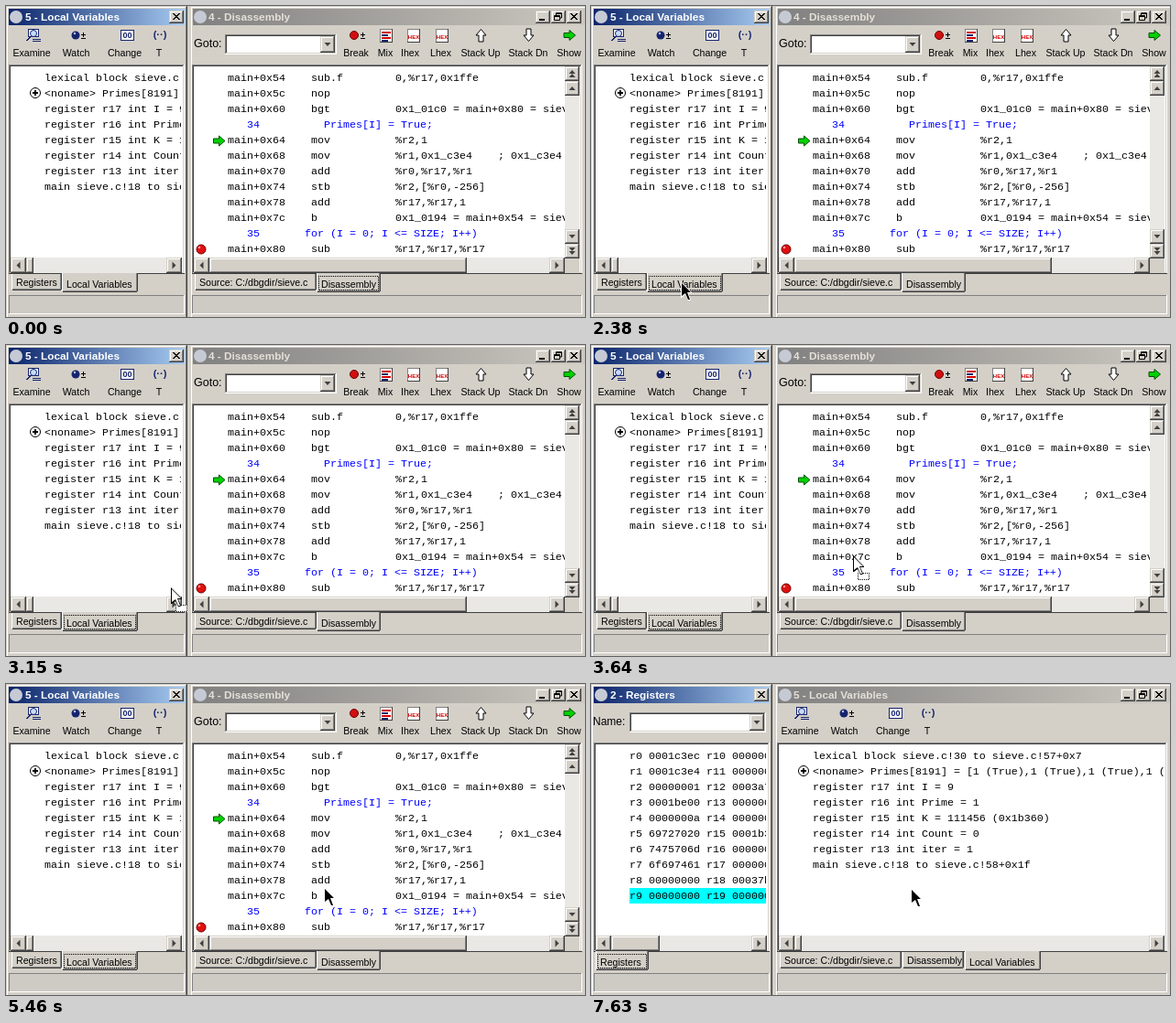
These frames come from a looping animation (632 px wide and 340 px high, 8190 ms). An HTML page with a canvas:

```html
<!DOCTYPE html>
<html>
<head>
<meta charset="utf-8">
<style>
html, body { margin: 0; width: 632px; height: 340px; overflow: hidden; background: #d4d0c8; }
canvas { display: block; }
</style>
</head>
<body>
<canvas id="stage" width="632" height="340"></canvas>
<script>
const c = document.getElementById('stage').getContext('2d');
const FACE = '#d4d0c8', SHADE = '#808080', DARK = '#404040', WHITE = '#fff', BLUE = '#0000ff', NAVY = '#16246e';
const LOOP = 8190, STEP = 70, ROW = 17;
const SANS = '"Liberation Sans", Arial, sans-serif';
const MONO = '11.665px "Liberation Mono", "Courier New", monospace';

function rect(x, y, w, h, color) {
  c.fillStyle = color;
  c.fillRect(x, y, w, h);
}
function text(s, x, y, { font = '10.6px ' + SANS, color = '#000', align = 'left' } = {}) {
  c.font = font;
  c.fillStyle = color;
  c.textAlign = align;
  c.fillText(s, x, y);
}
const code = (s, x, row, color) => text(s, x, 82 + row * ROW, { font: MONO, color });

function path(d, x, y, fill, stroke) {
  const p = new Path2D(d);
  c.save();
  c.translate(x, y);
  if (fill) { c.fillStyle = fill; c.fill(p); }
  if (stroke) { c.strokeStyle = stroke; c.lineWidth = 1; c.stroke(p); }
  c.restore();
}
function disc(x, y, r, fill, stroke) {
  c.beginPath();
  c.arc(x, y, r, 0, 7);
  c.fillStyle = fill;
  c.fill();
  if (stroke) { c.strokeStyle = stroke; c.lineWidth = 1; c.stroke(); }
}
function edge(x, y, w, h, light, dark) {
  rect(x, y, w, 1, light);
  rect(x, y, 1, h, light);
  rect(x, y + h - 1, w, 1, dark);
  rect(x + w - 1, y, 1, h, dark);
}
function raised(x, y, w, h) {
  rect(x, y, w, h, FACE);
  edge(x, y, w, h, FACE, DARK);
  edge(x + 1, y + 1, w - 2, h - 2, WHITE, SHADE);
}
function sunken(x, y, w, h, fill) {
  rect(x, y, w, h, fill);
  edge(x, y, w, h, SHADE, WHITE);
  if (fill == WHITE) edge(x + 1, y + 1, w - 2, h - 2, DARK, FACE);
}
function dotted(x, y, w, h) {
  for (let i = 0; i < w; i++)
    for (let j = 0; j < h; j++) {
      const border = !i || !j || i == w - 1 || j == h - 1;
      if (border && (i + j) % 2 == 0) rect(x + i, y + j, 1, 1, '#000');
    }
}
function clipped(x, y, w, h, draw) {
  c.save();
  c.beginPath();
  c.rect(x, y, w, h);
  c.clip();
  draw();
  c.restore();
}

const TRIANGLES = {
  left: 'M2 -4V4L-2 0Z', right: 'M-2 -4V4L2 0Z',
  up: 'M-3.5 2H3.5L0 -2Z', down: 'M-3.5 -2H3.5L0 2Z',
  top: 'M-3.5 0H3.5L0 -4ZM-3.5 4H3.5L0 0Z', bottom: 'M-3.5 -4H3.5L0 0ZM-3.5 0H3.5L0 4Z'
};
function button(x, y, w, h, glyph) {
  raised(x, y, w, h);
  path(TRIANGLES[glyph], x + w / 2, y + h / 2, DARK);
}
function hScroll(x, right, thumb) {
  rect(x, 275, right - x, 17, '#eae8e4');
  button(x, 275, 17, 17, 'left');
  raised(x + 17, 275, thumb, 17);
  button(right - 17, 275, 17, 17, 'right');
}
function vScroll() {
  rect(610, 66, 16, 226, FACE);
  rect(610, 98, 16, 146, '#eae8e4');
  button(610, 66, 16, 16, 'top');
  button(610, 82, 16, 16, 'up');
  button(610, 244, 16, 16, 'down');
  button(610, 260, 16, 16, 'bottom');
}
function combo(x, y, w, h) {
  sunken(x, y, w, h, WHITE);
  button(x + w - 18, y + 2, 16, h - 4, 'down');
}
function tab(x, w, label, selected, focus) {
  const top = selected ? 292 : 293, bottom = selected ? 313 : 311, h = bottom - top;
  rect(x, top, w, h, FACE);
  rect(x, top, 1, h - 1, WHITE);
  rect(x + 1, bottom - 1, w - 2, 1, DARK);
  rect(x + w - 1, top, 1, h - 1, DARK);
  rect(x + 1, bottom - 2, w - 2, 1, SHADE);
  rect(x + w - 2, top, 1, h - 1, SHADE);
  if (focus) dotted(x + 2, 295, w - 4, 16);
  text(label, x + 5, selected ? 308 : 306);
}

function frame(x, w, colors) {
  raised(x, 0, w, 342);
  const g = c.createLinearGradient(x + 3, 0, x + w - 4, 0);
  colors.forEach((color, i) => g.addColorStop(i, color));
  rect(x + 3, 3, w - 6, 18, g);
  disc(x + 11, 12, 7, '#c6cad4');
}
function titleButton(x, d) {
  raised(x, 5, 16, 14);
  path(d, x, 5, null, '#000');
}
const CLOSE = 'M4 3L11 10M5 3L12 10M11 3L4 10M12 3L5 10';

function pane(x, w) {
  sunken(x, 64, w, 229, WHITE);
  rect(x, 292, w, 1, DARK);
  sunken(x, 316, w, 21, '#cecac4');
}
function windows(leftTitle, rightTitle) {
  rect(0, 0, 632, 340, FACE);
  frame(0, 198, ['#0a246a', '#a6caf0']);
  frame(201, 434, ['#808080', '#ccc8c0']);
  const font = 'bold 11.8px ' + SANS;
  text(leftTitle, 21, 16, { font, color: WHITE });
  text(rightTitle, 221, 16, { font, color: '#e4e0d8' });
  titleButton(178, CLOSE);
  titleButton(578, 'M4 9.5H10M4 10.5H10');
  titleButton(595, 'M5.5 5V2.5H11.5V8H9M5 3.5H12M3.5 5.5H9.5V10.5H3.5ZM3 6.5H10');
  titleButton(612, CLOSE);
  pane(3, 192);
  pane(203, 426);
}

const label = (s, x) => text(s, x, 55, { align: 'center' });

function sheet(x, hex) {
  rect(x - 7, 25, 14, 15, WHITE);
  edge(x - 7, 25, 14, 15, SHADE, DARK);
  if (hex) text('HEX', x, 36, { font: 'bold 6px ' + SANS, color: '#d00000', align: 'center' });
  else for (let i = 0; i < 4; i++) rect(x - 5, 28 + i * 3, i % 2 ? 7 : 10, 2, i % 2 ? NAVY : '#d00000');
}
function plusMinus(x, y, color) {
  rect(x - 2, y, 5, 1, color);
  rect(x, y - 2, 1, 5, color);
  rect(x - 2, y + 4, 5, 1, color);
}
function variableTools(x) {
  rect(x + 24, 25, 12, 9, WHITE);
  edge(x + 24, 25, 12, 9, NAVY, NAVY);
  disc(x + 30, 30, 3.5, '#c8dcff', NAVY);
  path('M-3 3L-8 8M-2 3L-7 8', x + 30, 30, null, NAVY);
  rect(x + 29, 36, 9, 1, NAVY);
  rect(x + 29, 38, 9, 1, NAVY);
  disc(x + 76, 32, 4.5, NAVY);
  disc(x + 75, 30, 1.2, '#b8c4f0');
  plusMinus(x + 84, 31, '#000');
  rect(x + 125, 26, 15, 12, WHITE);
  edge(x + 125, 26, 15, 12, NAVY, NAVY);
  text('00', x + 132.5, 35, { font: 'bold 9px ' + SANS, color: NAVY, align: 'center' });
  text('(··)', x + 168, 35, { font: 'bold 11px ' + SANS, color: NAVY, align: 'center' });
  label('Examine', x + 28);
  label('Watch', x + 76.5);
  label('Change', x + 129.5);
  label('T', x + 167);
}
const ARROW = 'M-6 -2.5H0V-5.5L6.5 0L0 5.5V2.5H-6Z';
const UP = 'M-2.5 7V0H-5.5L0 -6.5L5.5 0H2.5V7Z';

function codeTools() {
  text('Goto:', 205, 45, { font: '12.5px ' + SANS });
  combo(239, 31, 122, 22);
  disc(380, 32, 4.5, '#d01010', '#700000');
  plusMinus(389, 31, '#000');
  sheet(415);
  sheet(445, true);
  sheet(476, true);
  path(UP, 518.5, 32, WHITE, '#000');
  c.save();
  c.translate(570.5, 32);
  c.scale(1, -1);
  path(UP, 0, 0, WHITE, '#000');
  c.restore();
  path(ARROW, 615, 32, '#00d000', '#005000');
  label('Break', 382);
  label('Mix', 414);
  label('Ihex', 441);
  label('Lhex', 474.5);
  label('Stack Up', 518);
  label('Stack Dn', 570);
  label('Show', 614.5);
}

const VARIABLES = [
  'lexical block sieve.c!30 to sieve.c!57+0x7',
  '<noname> Primes[8191] = [1 (True),1 (True),1 (True),1 (True)',
  'register r17 int I = 9',
  'register r16 int Prime = 1',
  'register r15 int K = 111456 (0x1b360)',
  'register r14 int Count = 0',
  'register r13 int iter = 1',
  'main sieve.c!18 to sieve.c!58+0x1f'
];
function variables(x, width) {
  clipped(x + 5, 66, width, 209, () => VARIABLES.forEach((s, i) => code(s, x + 42, i)));
  disc(x + 32, 95, 5.5, WHITE, '#000');
  rect(x + 29, 94, 6, 2, '#000');
  rect(x + 31, 92, 2, 6, '#000');
}

// Each row: address | opcode | operands, or line number | source text | column
const LISTING = [
  'main+0x54|sub.f|0,%r17,0x1ffe',
  'main+0x5c|nop|',
  'main+0x60|bgt|0x1_01c0 = main+0x80 = sieve.c!36',
  '34|Primes[I] = True;|347',
  'main+0x64|mov|%r2,1',
  'main+0x68|mov|%r1,0x1_c3e4    ; 0x1_c3e4',
  'main+0x70|add|%r0,%r17,%r1',
  'main+0x74|stb|%r2,[%r0,-256]',
  'main+0x78|add|%r17,%r17,1',
  'main+0x7c|b|0x1_0194 = main+0x54 = sieve.c!35',
  '35|for (I = 0; I <= SIZE; I++)|326',
  'main+0x80|sub|%r17,%r17,%r17'
];
function listing() {
  clipped(205, 66, 405, 209, () => LISTING.forEach((line, i) => {
    const [a, b, d] = line.split('|');
    if (a.length == 2) {
      code(a, 263, i, BLUE);
      code(b, +d, i, BLUE);
    } else {
      code(a, 242, i);
      code(b, 333, i);
      code(d, 425, i);
    }
  }));
  path(ARROW, 232.5, 147.5, '#00d000', '#005000');
  disc(213, 266, 5, '#e01010', '#700000');
  disc(211, 264, 1.3, '#ff9090');
}

const LOW = '0001c3ec 0001c3e4 00000001 0001be00 0000000a 69727020 7475706d 6f697461 00000000 00000000'.split(' ');
const HIGH = { 2: '0003a7', 5: '0001b3', 8: '00037b' };
function registers() {
  rect(42, 223, 149, 17, '#00ffff');
  clipped(5, 66, 186, 209, () =>
    LOW.forEach((v, i) => code(`r${i} ${v} r1${i} ${HIGH[i] || '000000'}`, 42, i)));
}

function beforeDrop(t) {
  const picked = t >= 1470;
  windows('5 - Local Variables', '4 - Disassembly');
  variableTools(0);
  codeTools();
  variables(0, 186);
  listing();
  hScroll(5, 192, 8);
  hScroll(205, 610, 281);
  vScroll();
  tab(6, 55, 'Registers');
  tab(61, 83, 'Local Variables', true, picked);
  tab(206, 133, 'Source: C:/dbgdir/sieve.c');
  tab(339, 70, 'Disassembly', true, !picked);
}
function afterDrop() {
  windows('2 - Registers', '5 - Local Variables');
  text('Name:', 2, 45, { font: '12px ' + SANS });
  combo(42, 31, 149, 22);
  variableTools(200);
  registers();
  variables(200, 421);
  hScroll(5, 192, 53);
  hScroll(205, 626, 8);
  tab(5, 58, 'Registers', true, true);
  tab(206, 133, 'Source: C:/dbgdir/sieve.c');
  tab(340, 67, 'Disassembly');
  tab(408, 83, 'Local Variables', true);
}

// start, steps, from, to, optional bend
const MOVES = [
  [210, 7, 64.5, 264, 89, 299],
  [770, 2, 89, 299, 96, 306],
  [1050, 2, 96, 306, 98, 302],
  [2380, 12, 90.5, 304.3, 180, 265],
  [3220, 12, 180, 265, 346, 223, 281, 223],
  [5460, 1, 347, 222, 347, 222],
  [7560, 2, 347, 222, 349, 223]
];
function pointer(t) {
  if (t < 210 || (t >= 1680 && t < 2380)) return;
  const [start, steps, x0, y0, x1, y1, bx = (x0 + x1) / 2, by = (y0 + y1) / 2] =
    MOVES.filter(m => m[0] <= t).pop();
  const k = Math.min(steps, Math.floor((t - start) / STEP) + 1) / steps;
  const bend = (a, b, d) => Math.round(a * (1 - k) ** 2 + 2 * b * k * (1 - k) + d * k * k);
  const x = bend(x0, bx, x1), y = bend(y0, by, y1);
  const dragging = t >= 2450 && t < 5460;
  if (dragging) {
    rect(x + 5, y + 19, 13, 8, WHITE);
    dotted(x + 5, y + 19, 13, 8);
  }
  path('M0 0L12 12V13H8L11 20L10 21H8L5 15L1 18H0Z', x, y, dragging ? '#000' : WHITE);
  path('M1 2L11 12H7L10 20H8L5 13L1 16Z', x, y, dragging ? WHITE : '#000');
}

function draw() {
  const t = performance.now() % LOOP;
  if (t < 5600) beforeDrop(t);
  else afterDrop();
  pointer(t);
  requestAnimationFrame(draw);
}
draw();
</script>
</body>
</html>
```
